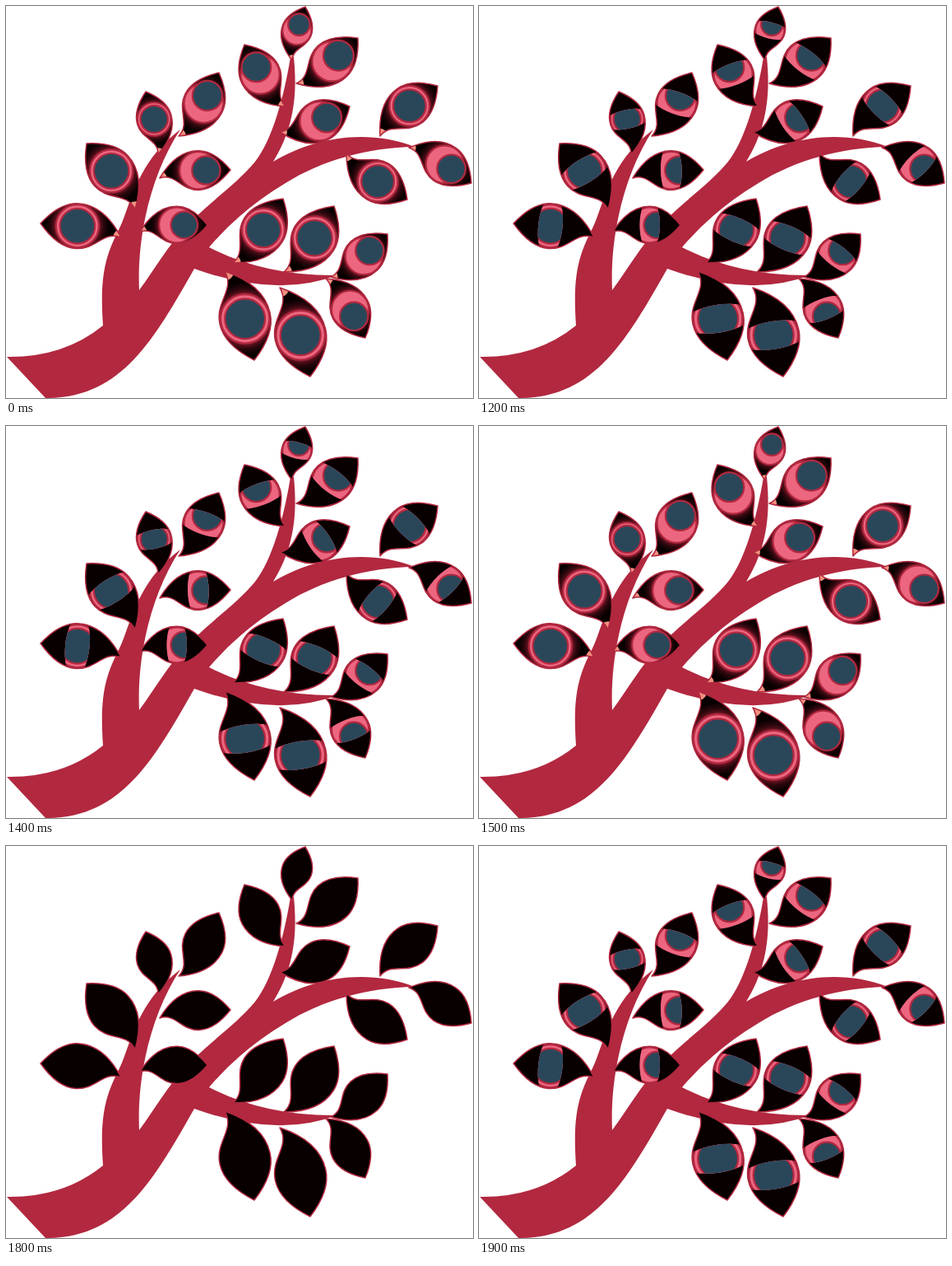
An HTML page that plays this animation: 568x476 px, repeating every 2 s.

```html
<!DOCTYPE html>
<html lang="en">
<head>
<meta charset="utf-8">
<title>Blinking tree</title>
<style>
  html, body { margin: 0; width: 100%; height: 100%; overflow: hidden; background: #fff; }
  svg { display: block; width: 568px; height: 476px; }
</style>
</head>
<body>
<svg viewBox="0 0 568 476">
  <defs id="defs">
    <radialGradient id="halo">
      <stop offset=".69" stop-color="#b2283f"/>
      <stop offset=".73" stop-color="#5c101d"/>
      <stop offset=".83" stop-color="#2c070d"/>
      <stop offset="1" stop-color="#080000"/>
    </radialGradient>
  </defs>
  <path fill="#b2283f" d="M1 426 Q70 427 118 388
    C114 330 120 305 137 272 C152 242 158 190 212 150
    C176 205 159 280 162 345
    C182 318 197 291 219 268 C245 240 282 215 303 189
    C324 162 338 111 346 62 L350 62
    C355 110 349 150 325 189 C370 162 435 147 497 171
    C440 172 385 187 340 215 Q285 248 247 293
    Q315 328 402 327 Q330 355 229 319
    C180 405 140 477 48 476 Z"/>
  <g id="leaves"></g>
</svg>
<script>
const CRIMSON = '#b2283f', PINK = '#ec6680', SLATE = '#2a475a';
const BLACK = '#080000', SALMON = '#f2907f';
const LOOP = 2000, STEP = 100, BLINKS = [1200, 1700];
const defs = document.getElementById('defs');
const leaves = document.getElementById('leaves');
const eyes = [];

function add(parent, tag, attrs) {
  const el = document.createElementNS('http://www.w3.org/2000/svg', tag);
  for (const key in attrs) el.setAttribute(key, attrs[key]);
  parent.appendChild(el);
  return el;
}

// Everything follows from the tip, the stem end, the bulging side (1 or -1)
// and whether the iris looks towards the tip.
function leaf(tx, ty, bx, by, side, looks) {
  const id = eyes.length;
  const dx = bx - tx, dy = by - ty;
  const r = .275 * Math.hypot(dx, dy);
  const cx = tx + .45 * dx + .045 * side * dy;
  const cy = ty + .45 * dy - .045 * side * dx;
  const len = Math.hypot(cx - tx, cy - ty);
  const ux = (cx - tx) / len, uy = (cy - ty) / len;

  // a runs along the leaf, b across it, both in half widths
  const at = (x, y, a, b) =>
    `${x + r * (a * ux + b * side * uy)} ${y + r * (a * uy - b * side * ux)} `;
  const d = `M${tx} ${ty} C` + at(tx, ty, .45, .55) + at(cx, cy, -.62, 1) + at(cx, cy, 0, 1) +
    'C' + at(cx, cy, .95, 1) + at(bx, by, -.4, .65) + `${bx} ${by} ` +
    'C' + at(bx, by, -.8, .25) + at(cx, cy, .9, -1) + at(cx, cy, 0, -1) +
    'C' + at(cx, cy, -.62, -1) + at(tx, ty, .45, -.55) + `${tx} ${ty}Z`;

  const turn = Math.atan2(uy, .7 * ux) * 180 / Math.PI;
  const slit = { cx, cy, rx: r * .54, ry: r * 1.4, transform: `rotate(${turn} ${cx} ${cy})` };
  add(add(defs, 'clipPath', { id: 'leaf' + id }), 'path', { d });
  add(add(defs, 'clipPath', { id: 'slit' + id }), 'ellipse', slit);

  const shift = looks ? .4 * r : 0;
  add(leaves, 'path', { d, fill: BLACK });
  const inside = add(leaves, 'g', { 'clip-path': `url(#leaf${id})` });
  const ball = add(inside, 'g');
  add(ball, 'circle', { cx, cy, r: r * 1.4, fill: 'url(#halo)' });
  add(ball, 'circle', { cx, cy, r: r * .94, fill: PINK, stroke: CRIMSON, 'stroke-width': 1.6 });
  add(ball, 'circle', {
    cx: cx - shift * ux, cy: cy - shift * uy, r: r * (looks ? .72 : .78),
    fill: SLATE, stroke: CRIMSON, 'stroke-width': 2.2
  });
  const duct = add(inside, 'circle', { cx: bx, cy: by, r: r * .36, fill: SALMON });
  add(leaves, 'path', { d, fill: 'none', stroke: CRIMSON, 'stroke-width': 1.5, 'stroke-linejoin': 'round' });
  eyes.push({ ball, duct, slit: `url(#slit${id})` });
}

function grow(side, looks, ends) {
  for (const [tip, base] of ends) leaf(...tip, ...base, side, looks);
}

grow(1, false, [
  [[42, 264], [140, 281]], [[98, 167], [157, 247]], [[170, 104], [185, 180]],
  [[488, 235], [414, 179]], [[337, 234], [276, 312]], [[399, 243], [338, 323]]
]);
grow(1, true, [
  [[259, 81], [210, 158]], [[428, 39], [353, 94]],
  [[418, 122], [333, 153]], [[464, 277], [395, 329]]
]);
grow(-1, false, [
  [[525, 97], [455, 158]], [[302, 430], [266, 322]], [[370, 450], [333, 342]]
]);
grow(-1, true, [
  [[273, 199], [187, 209]], [[245, 266], [163, 274]], [[290, 47], [340, 122]],
  [[364, 1], [348, 66]], [[566, 215], [490, 172]], [[437, 403], [389, 331]]
]);

// Each blink is three steps: half, shut, half.
function pose(t) {
  for (const start of BLINKS) {
    const step = Math.floor((t - start) / STEP);
    if (step >= 0 && step < 3) return step === 1 ? 'shut' : 'half';
  }
  return 'open';
}

function draw(t) {
  const now = pose(t);
  for (const { ball, duct, slit } of eyes) {
    ball.setAttribute('display', now === 'shut' ? 'none' : 'inline');
    duct.setAttribute('display', now === 'open' ? 'inline' : 'none');
    ball.setAttribute('clip-path', now === 'half' ? slit : 'none');
  }
}

const begin = performance.now();
function tick() {
  draw((performance.now() - begin) % LOOP);
  requestAnimationFrame(tick);
}
tick();
</script>
</body>
</html>
```
